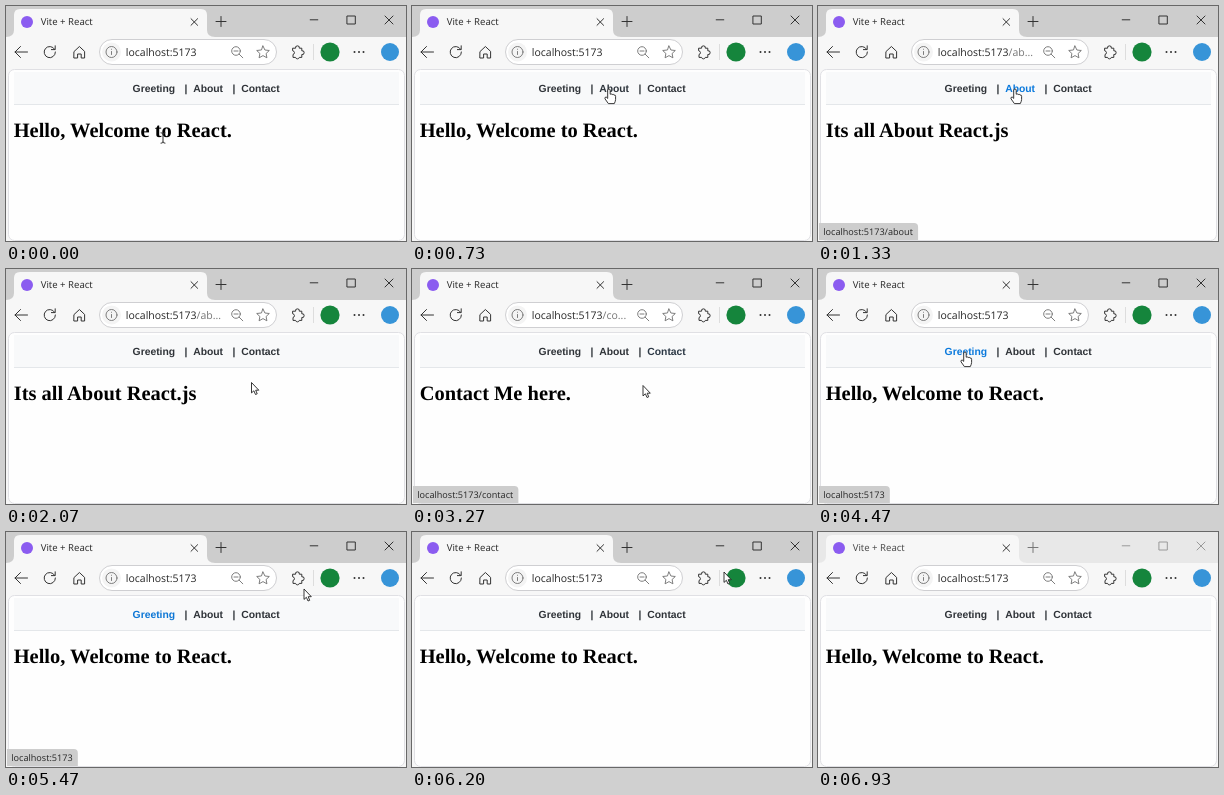
Recreate the animation shown at these times as an HTML page. Size 400 px wide and 235 px high, loop 7 s.

```html
<!DOCTYPE html>
<html lang="en">
<head>
<meta charset="utf-8">
<title>Router demo</title>
<style>
  html, body { margin: 0; width: 100%; height: 100%; overflow: hidden; background: #f7f7f7; }
  svg { display: block; width: 100vw; height: 100vh; }
  text { font-family: "Open Sans", "Noto Sans", sans-serif; fill: #262626; white-space: pre; text-rendering: geometricPrecision; }
  .icon { fill: none; stroke: #333; stroke-width: 1; stroke-linecap: round; stroke-linejoin: round; }
  .thin { stroke: #707070; stroke-width: .9; }
  .dots { stroke-width: 2; }
  .nav text { font: bold 10.35px "Liberation Sans", Arial, sans-serif; fill: #2f3338; }
  #heading { font: bold 20.45px "Liberation Serif", "Times New Roman", serif; fill: #000; }
  .cursor { fill: #fff; stroke: #222; stroke-width: .9; stroke-linejoin: round; }
</style>
</head>
<body>
<svg viewBox="0 0 400 235" preserveAspectRatio="none">
  <!-- title bar and tab -->
  <rect id="bar" width="400" height="32"/>
  <path fill="#f7f7f7" d="M0 31Q8 31 8 24V9Q8 3 14 3H195Q201 3 201 9V24Q201 31 209 31H400V235H0Z"/>
  <circle cx="21" cy="16" r="6" fill="#8b5cf0"/>
  <text id="tab" x="34.7" y="19.4" font-size="9.6">Vite + React</text>
  <path class="icon" d="M185 12.7l6.6 6.6m0-6.6l-6.6 6.6"/>
  <path class="icon" id="plus" d="M210 15.5h10m-5-5v10"/>
  <path class="icon" id="buttons" d="M304.2 13.8h7.6M341.3 10h8v8h-8zM379 10l8 8m0-8l-8 8"/>

  <!-- toolbar -->
  <path class="icon" d="M21.5 46H9m5.5-5.5L9 46l5.5 5.5"/>
  <path class="icon" d="M48.6 43.2A5.6 5.6 0 1 0 49.4 46M49.2 39.8v3.8h-3.8"/>
  <path class="icon" d="M68.2 45.4L73.4 40.5l5.2 4.9V52h-3.4v-4h-3.6v4h-3.4z"/>
  <rect x="93.5" y="33.5" width="177" height="25" rx="12.5" fill="#fff" stroke="#cfcfd2"/>
  <circle cx="105.5" cy="46" r="9.5" fill="#f4f4f4"/>
  <circle class="icon thin" cx="105.5" cy="46" r="5.5"/>
  <path class="icon thin" d="M105.5 45.5v3M105.5 43.2v.1"/>
  <text x="119.8" y="49.6" font-size="10.5">localhost:5173<tspan id="path" fill="#757575"></tspan></text>
  <circle class="icon thin" cx="230" cy="45" r="4.3"/>
  <path class="icon thin" d="M233.2 48.2l3.6 3.6M228 45h4"/>
  <path class="icon thin" d="M257 40l1.9 4 4.4.5-3.2 3 .8 4.3-3.9-2.2-3.9 2.2.8-4.3-3.2-3 4.4-.5z"/>
  <path class="icon" d="M287 42.2h2.6a1.9 1.9 0 1 1 3.7 0h2.5v2.6a1.9 1.9 0 1 1 0 3.7v2.9h-2.5a1.9 1.9 0 0 1-3.7 0H287v-2.9a1.9 1.9 0 0 0 0-3.7z"/>
  <path stroke="#ddd" d="M307.5 38v16"/>
  <circle cx="324" cy="46" r="9.6" fill="#15853c"/>
  <path class="icon dots" d="M348.5 46h.01M353 46h.01M357.5 46h.01"/>
  <circle cx="384" cy="46" r="9" fill="#3794d8"/>

  <!-- page -->
  <rect x="2.5" y="63.5" width="396" height="171" rx="6" fill="#fefefe" stroke="#e0e0e4"/>
  <path fill="#f8f9fa" d="M8 66H393V98H8Z"/>
  <path stroke="#e4e7ea" d="M8 98.5H393"/>
  <g class="nav">
    <text class="link" x="126.6" y="86">Greeting</text>
    <text x="178.4" y="86">|</text>
    <text class="link" x="187.2" y="86">About</text>
    <text x="226.5" y="86">|</text>
    <text class="link" x="235.3" y="86">Contact</text>
  </g>
  <text id="heading" x="7.7" y="131"></text>

  <g id="status">
    <path id="bubble" fill="#cdcdcd"/>
    <text id="address" x="5.3" y="228.6" font-size="9.1"></text>
  </g>

  <g id="pointer">
    <path id="arrow" class="cursor" d="M0 0V10.4L2.4 8.3 4 12 5.7 11.3 4.2 7.7H7.3Z"/>
    <path id="hand" class="cursor" d="M-1.3 8V1Q-1.2 0 0 0T1.2 1V5.2Q2.2 4.4 3.2 5.5 4.3 4.8 5 6 6.6 5.6 6.6 7.3V10.5Q6.4 12.5 5.3 14.6H-.6L-4 9.8Q-4.4 8-2.8 8L-1.3 9.4Z"/>
    <path id="beam" class="icon" d="M-2-5.2Q0-5.2 0-4V4Q0 5.2-2 5.2M2-5.2Q0-5.2 0-4M0 4Q0 5.2 2 5.2"/>
  </g>
</svg>

<script>
const LOOP = 7000, FPS = 15, FADE = 300;
const $ = id => document.getElementById(id);
const links = document.querySelectorAll(".link");

const pages = [
  { at: 0, path: "", text: "Hello, Welcome to React." },
  { at: 1130, path: "/ab...", text: "Its all About React.js" },
  { at: 2730, path: "/co...", text: "Contact Me here." },
  { at: 4070, path: "", text: "Hello, Welcome to React." }
];
const hovers = [
  { link: 1, from: 730, to: 1590, url: "localhost:5173/about" },
  { link: 2, from: 2450, to: 3050, url: "localhost:5173/contact" },
  { link: 0, from: 3860, to: 5460, url: "localhost:5173" }
];
// time, x, y of the pointer tip
const moves = [
  [0, 157, 132], [200, 157, 132], [740, 197, 83], [1500, 197, 83],
  [1950, 245.5, 113.5], [2200, 245.5, 113.5], [2520, 254, 83], [2980, 254, 83],
  [3250, 231, 116.5], [3400, 231, 116.5], [3790, 149, 90.5], [3900, 147, 83],
  [5405, 147, 83], [5465, 298, 57], [5750, 312, 40], [6670, 312, 40]
];

const clamp = v => Math.max(0, Math.min(1, v));
const smooth = v => v * v * (3 - 2 * v);
const easeOut = v => 1 - (1 - v) ** 2;
const show = (id, on) => $(id).style.display = on ? "" : "none";

function mix(k) {
  const base = [47, 51, 56], blue = [10, 121, 220];
  return `rgb(${base.map((c, i) => Math.round(c + (blue[i] - c) * k))})`;
}

function pointerAt(t) {
  const i = moves.findIndex(m => m[0] > t);
  if (i < 0) return moves[moves.length - 1].slice(1);
  const [t0, x0, y0] = moves[i - 1], [t1, x1, y1] = moves[i];
  const k = smooth((t - t0) / (t1 - t0));
  return [x0 + (x1 - x0) * k, y0 + (y1 - y0) * k];
}

function draw(t) {
  const page = pages.filter(p => p.at <= t).pop();
  $("heading").textContent = page.text;
  $("path").textContent = page.path;

  const focused = t < 6720;
  $("bar").style.fill = focused ? "#cdcdcd" : "#e8e8e8";
  $("buttons").style.stroke = focused ? "#333" : "#999";
  $("plus").style.stroke = focused ? "#333" : "#777";
  $("tab").style.fill = focused ? "#262626" : "#444";

  for (const h of hovers) {
    const k = easeOut(clamp((t - h.from) / FADE)) - easeOut(clamp((t - h.to) / FADE));
    links[h.link].style.fill = mix(k);
  }

  const tip = hovers.find(h => t > h.from + 80 && t < h.to + 400);
  show("status", tip);
  if (tip) {
    $("address").textContent = tip.url;
    const right = $("address").getComputedTextLength() + 10.5;
    $("bubble").setAttribute("d", `M1 217H${right - 4}q4 0 4 4V234H1Z`);
    $("status").style.opacity = clamp((tip.to + 400 - t) / 120);
  }

  const [x, y] = pointerAt(t);
  const over = hovers.some(h => t >= h.from && t < h.to);
  const beam = t < 740 && y > 113;
  $("pointer").setAttribute("transform", `translate(${x} ${y})`);
  show("pointer", t < 6670);
  show("hand", over);
  show("beam", beam);
  show("arrow", !over && !beam);
}

const start = performance.now();
function tick() {
  const t = (performance.now() - start) % LOOP;
  draw(Math.floor(t * FPS / 1000 + .1) * 1000 / FPS);
  requestAnimationFrame(tick);
}
tick();
</script>
</body>
</html>
```
